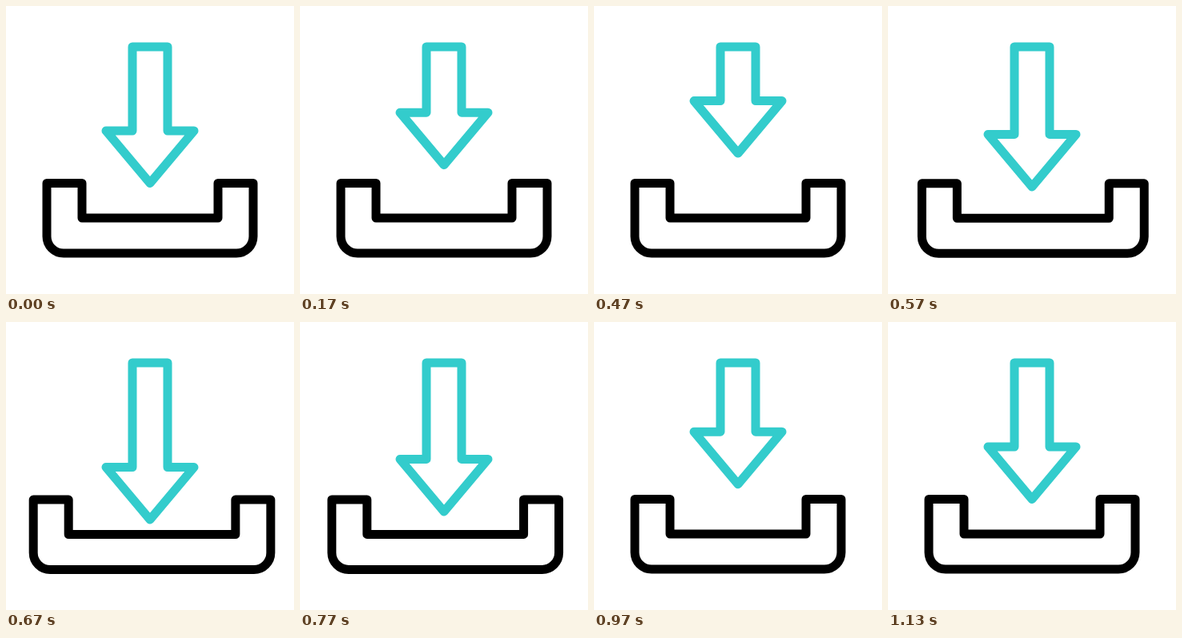
Animation of 360x360 px, one loop 1500 ms. Source, as an HTML page with a canvas:

```html
<!DOCTYPE html>
<html lang="en">
<head>
<meta charset="utf-8">
<title>Download</title>
<style>
  html, body { margin: 0; width: 100%; height: 100%; overflow: hidden; background: #fff; }
  canvas { display: block; width: 360px; height: 360px; }
</style>
</head>
<body>
<canvas id="stage" width="360" height="360"></canvas>
<script>
const ctx = document.getElementById("stage").getContext("2d");
const LOOP = 1500;
const FPS = 30;

// Keys are [frame, value]; frames may be fractional.
const ARROW_KEYS = [[0, 156], [11.4, 100], [19.8, 181.6], [30.4, 135], [34, 156]];
const STRETCH_KEYS = [[15, 0], [19, 1], [29, 0]];

const ease = u => u * u * (3 - 2 * u);

function valueAt(keys, frame) {
  if (frame <= keys[0][0]) return keys[0][1];
  for (let i = 1; i < keys.length; i++) {
    const [start, from] = keys[i - 1];
    const [end, to] = keys[i];
    if (frame < end) return from + (to - from) * ease((frame - start) / (end - start));
  }
  return keys[keys.length - 1][1];
}

function strokeClosed(color) {
  ctx.closePath();
  ctx.strokeStyle = color;
  ctx.stroke();
}

function drawArrow(shoulder) {
  ctx.beginPath();
  const points = [
    [158, 51], [202, 51], [202, shoulder], [235, shoulder],
    [180, shoulder + 65.5], [125, shoulder], [158, shoulder]
  ];
  points.forEach(([x, y]) => ctx.lineTo(x, y));
  strokeClosed("#33cccc");
}

function drawTray(stretch) {
  const left = 51 - 17.3 * stretch;
  const right = 309 + 22.5 * stretch;
  const dy = 0.6 * stretch;
  const top = 221.5 + dy, floor = 265 + dy, bottom = 309 + dy;
  const wall = 44, radius = 21;
  ctx.beginPath();
  ctx.moveTo(left, top);
  ctx.lineTo(left + wall, top);
  ctx.lineTo(left + wall, floor);
  ctx.lineTo(right - wall, floor);
  ctx.lineTo(right - wall, top);
  ctx.lineTo(right, top);
  ctx.arcTo(right, bottom, left, bottom, radius);
  ctx.arcTo(left, bottom, left, top, radius);
  strokeClosed("#000");
}

function draw(now) {
  const frame = Math.floor(((now % LOOP) + 4) * FPS / 1000);
  ctx.fillStyle = "#fff";
  ctx.fillRect(0, 0, 360, 360);
  ctx.lineWidth = 11;
  ctx.lineJoin = "round";
  drawArrow(valueAt(ARROW_KEYS, frame));
  drawTray(valueAt(STRETCH_KEYS, frame));
}

const startTime = performance.now();
function tick() {
  draw(performance.now() - startTime);
  requestAnimationFrame(tick);
}
tick();
</script>
</body>
</html>
```
